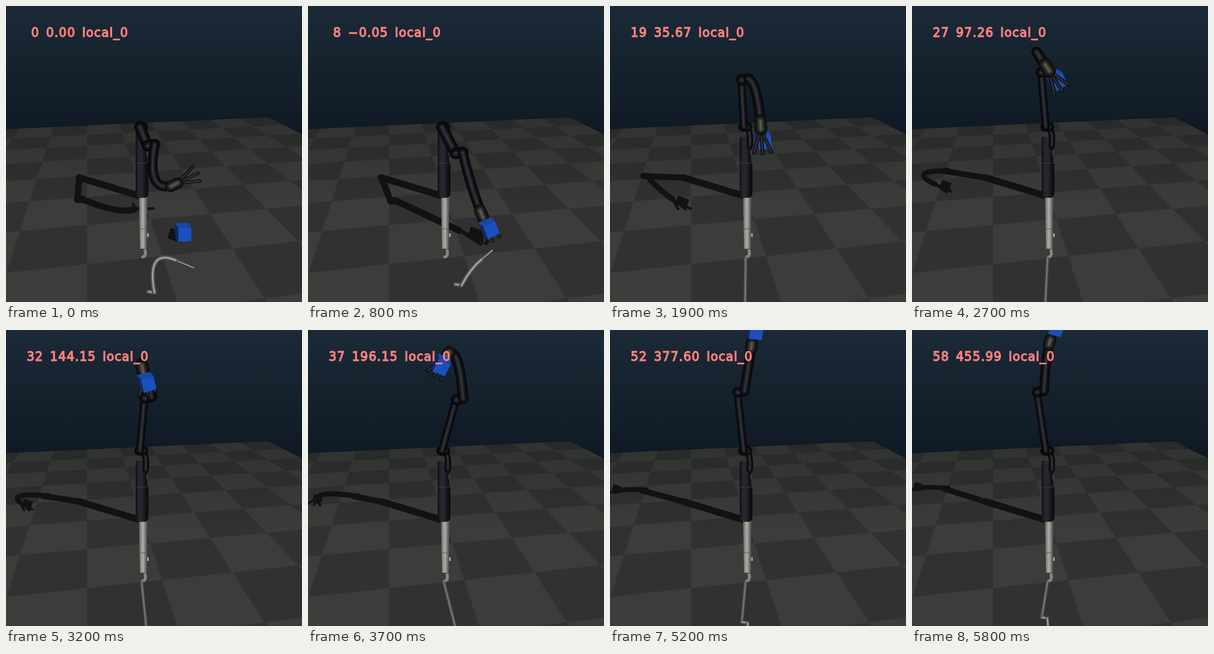
An HTML page with a canvas that plays this animation: 500 px wide and 500 px high, repeating every 5.9 s.

```html
<!DOCTYPE html>
<html lang="en">
<head>
<meta charset="utf-8">
<title>Robot arm lifting a cube</title>
<style>
html, body { margin: 0; width: 100%; height: 100%; overflow: hidden; background: #0d1620; }
canvas { display: block; }
#label {
  position: absolute; left: 35px; top: 33px; white-space: pre;
  font: 20.5px/24px "DejaVu Sans", sans-serif;
  letter-spacing: 1px; word-spacing: 3.7px;
  color: #ff8080; -webkit-text-stroke: 1.3px #ff8080;
}
</style>
</head>
<body>
<canvas id="stage" width="500" height="500"></canvas>
<div id="label"></div>
<script>
const ctx = document.getElementById('stage').getContext('2d');
const label = document.getElementById('label');

// Camera: focal length in pixels, height above the floor, pitch 20deg, yaw 10deg.
const FOCAL = 603.55, HEIGHT = 3.03, RAD = Math.PI / 180;
const S = Math.sin(20 * RAD), C = Math.cos(20 * RAD);
const YS = Math.sin(10 * RAD), YC = Math.cos(10 * RAD);

// Space is [right, forward, up]; screen points carry their pixel scale.
function project([r, d, z]) {
  const h = z - HEIGHT, k = C * d - S * h;
  return [250 + FOCAL * r / k, 250 - FOCAL * (C * h + S * d) / k, FOCAL / k];
}
function lift(x, y, d) {
  const q = (y - 250) / FOCAL;
  const h = -(q * C + S) * d / (C - q * S);
  return [(x - 250) / FOCAL * (C * d - S * h), d, h + HEIGHT];
}
const shadow = ([r, d, z]) => [r - .98 * z, d + .65 * z, 0];
const mirror = ([r, d, z]) => [r, d, -z];
const same = p => p;
const add = (p, v, k = 1) => p.map((c, n) => c + v[n] * k);
const mix = (p, q, t) => p.map((c, n) => c + (q[n] - c) * t);
const dot = (p, q) => p.reduce((sum, c, n) => sum + c * q[n], 0);
const unit = v => v.map(c => c / Math.hypot(...v));

// Key poses on screen; distances follow from the arm's geometry.
const poses = [
  { step: 0,  score: 0,      elbow: [239, 236], wrist: [236, 325], hand: [290, 299] },
  { step: 8,  score: -.05,   elbow: [249, 249], wrist: [276, 310], hand: [296, 358] },
  { step: 19, score: 35.67,  elbow: [222, 125], wrist: [250, 132], hand: [255, 208] },
  { step: 27, score: 97.26,  elbow: [218, 112], wrist: [190, 45],  hand: [232, 110] },
  { step: 37, score: 196.15, elbow: [250, 118], wrist: [254, 14],  hand: [232, 48] },
  { step: 46, score: 301.15, elbow: [221, 106], wrist: [245, 50],  hand: [243, 30] },
  { step: 58, score: 455.99, elbow: [211, 105], wrist: [226, 40],  hand: [234, 16] }
];
const GRASP = 8, REACH = 1;
const base = lift(230, 322, 6), shoulder = lift(226, 204, 6);
const cubeRest = [302, 387];

// Monotone cubic through one value per pose.
function at(step, pick) {
  const last = poses.length - 1;
  const secant = n => (pick(poses[n + 1]) - pick(poses[n])) / (poses[n + 1].step - poses[n].step);
  const slope = n => {
    const a = secant(Math.max(n - 1, 0)), b = secant(Math.min(n, last - 1));
    return a * b > 0 ? 2 * a * b / (a + b) : 0;
  };
  let i = 0;
  while (i < last - 1 && step >= poses[i + 1].step) i++;
  const h = poses[i + 1].step - poses[i].step, t = (step - poses[i].step) / h;
  const e = t * t * (3 - 2 * t);
  return pick(poses[i]) * (1 - e) + pick(poses[i + 1]) * e
    + h * t * (1 - t) * ((1 - t) * slope(i) - t * slope(i + 1));
}
const place = (step, joint) => [0, 1].map(n => at(step, p => p[joint][n]));

// Nearest point on the view ray that lies one upper arm from the shoulder.
function reachFrom(x, y) {
  const eye = [0, 0, HEIGHT];
  const ray = add(lift(x, y, 1), eye, -1), goal = add(shoulder, eye, -1);
  const a = dot(ray, ray), b = dot(ray, goal);
  const root = Math.sqrt(Math.max(0, b * b - a * (dot(goal, goal) - REACH * REACH)));
  return lift(x, y, (b - root) / a);
}

function polygon(points, fill) {
  ctx.beginPath();
  points.forEach(([x, y]) => ctx.lineTo(x, y));
  ctx.closePath();
  ctx.fillStyle = fill;
  ctx.fill();
}

// Layers of [colour, share of width] that brighten towards the middle.
function shade(hue, saturation, dark, light, share = 1) {
  return Array.from({ length: 8 }, (_, i) => {
    const l = dark + (light - dark) * (i / 7) ** 2;
    return [`hsl(${hue} ${saturation}% ${l}%)`, share * (1 - i / 8)];
  });
}
const METAL = shade(240, 9, 4, 22);
const HAND = shade(60, 4, 6, 34);
const FINGER = shade(0, 0, 6, 24);
const SHADE = [['#121311', .75]];
const GLOSS = shade(60, 2, 26, 70, .6);
const DIM = shade(60, 2, 28, 50, .6);

// Two points give a line, three a curve bent by the middle one.
function tube(points, width, layers, move = same, cap = 'round') {
  const p = points.map(q => project(move(q)));
  const scale = p.reduce((sum, q) => sum + q[2], 0) / p.length;
  const [bend, end] = [p[1], p[p.length - 1]];
  ctx.beginPath();
  ctx.moveTo(p[0][0], p[0][1]);
  ctx.quadraticCurveTo(bend[0], bend[1], end[0], end[1]);
  ctx.lineCap = cap;
  for (const [colour, share] of layers) {
    ctx.strokeStyle = colour;
    ctx.lineWidth = width * share * scale;
    ctx.stroke();
  }
}

function across(x0, x1, ...colours) {
  const g = ctx.createLinearGradient(x0, 0, x1, 0);
  colours.forEach((c, i) => g.addColorStop(i / (colours.length - 1), c));
  return g;
}

function backdrop() {
  const sky = ctx.createLinearGradient(0, 0, 0, 205);
  sky.addColorStop(0, '#1b2a37');
  sky.addColorStop(1, '#0f1a25');
  ctx.fillStyle = sky;
  ctx.fillRect(0, 0, 500, 500);

  const spot = (i, j) => {
    const u = 1.028 * i - .19, v = 11.166 - 1.01 * j;
    return project([u * YC - v * YS, u * YS + v * YC, 0]);
  };
  const floor = [spot(-6, 0), spot(6, 0), spot(6, 9), spot(-6, 9)];
  polygon(floor, '#313131');
  for (let j = 0; j < 9; j++)
    for (let i = -6; i < 6; i++)
      if ((i + j) % 2 === 0)
        polygon([spot(i, j), spot(i + 1, j), spot(i + 1, j + 1), spot(i, j + 1)], '#3b3d3a');
  const haze = ctx.createLinearGradient(0, 190, 0, 340);
  haze.addColorStop(0, 'rgba(10,14,16,.22)');
  haze.addColorStop(1, 'rgba(10,14,16,0)');
  polygon(floor, haze);
}

function column(top) {
  ctx.fillStyle = across(219, 241, '#101014', '#26262e', '#26262e', '#131318', '#09090c');
  ctx.beginPath();
  ctx.roundRect(219, top, 19.5, 268 - top, 3);
  ctx.roundRect(219, 264, 21.5, 60, [2, 2, 7, 7]);
  ctx.fill();
  ctx.fillStyle = '#3a3a42';
  ctx.fillRect(220, 265, 19, 1);
  ctx.fillRect(237, 244, 3, 8);
}

function columnMirror() {
  polygon([[224.5, 323], [239, 323], [237.5, 410], [226.5, 410]],
    across(224, 239, '#4c4c4a', '#8c8c89', '#acaca9', '#777775', '#444442'));
  ctx.fillStyle = '#5b5b58';
  ctx.fillRect(225, 376, 13, 1);
  ctx.fillStyle = '#b0b0ac';
  ctx.fillRect(238.5, 384, 2.5, 6);
  ctx.strokeStyle = '#858581';
  ctx.lineWidth = 5;
  ctx.lineCap = 'round';
  ctx.beginPath();
  ctx.moveTo(235, 413);
  ctx.quadraticCurveTo(237, 423, 231, 424);
  ctx.stroke();
}

// Three fingers fan out around the direction of the hand.
function fingers(hand, [r, d, z]) {
  return [-.4, 0, .4].map(a => {
    const dir = [r * Math.cos(a) - z * Math.sin(a), d, r * Math.sin(a) + z * Math.cos(a)];
    return [add(hand, dir, .04), add(hand, dir, .35)];
  });
}

function drawCube([x, y], turn) {
  ctx.save();
  ctx.translate(x, y);
  ctx.rotate(turn);
  polygon([[-11, -12], [-17, -20], [7, -21], [11, -12]], '#1a46a4');
  polygon([[-11, -12], [-17, -20], [-16, 5], [-11, 12]], '#0e2860');
  polygon([[-11, -12], [11, -12], [11, 10], [-11, 12]], '#1b4fbd');
  ctx.restore();
}

function draw(step) {
  const [ex, ey] = place(step, 'elbow');
  const elbow = reachFrom(ex, ey);
  const joint = lift(ex + 12, ey - 2, elbow[1]);
  const away = step - GRASP;
  const hand = lift(...place(step, 'hand'), 4.6 + (away < 0 ? -.056 : .02) * away);
  const wrist = lift(...place(step, 'wrist'), (elbow[1] + hand[1]) / 2);
  const aim = unit(add(hand, wrist, -1));
  const claws = fingers(hand, aim);
  const forearm = [joint, wrist, hand];
  const raised = elbow[2] > shoulder[2] + .2;

  const held = Math.min(1, Math.max(0, (step - 5) / (GRASP - 5)));
  const grip = project(add(hand, aim, .2));
  const cube = mix(cubeRest, [grip[0] + 5, grip[1] - 1], held);
  const turn = -.5 * held * Math.sin(2 * Math.atan2(aim[2], aim[0]) + Math.PI);
  const cubeHidden = raised && hand[2] < 2.6;

  backdrop();

  const centre = lift(cube[0] - 2, cube[1] - 4, held < 1 ? 4.62 : hand[1]);
  const block = [-.12, .12].map(z => [centre[0], centre[1], Math.max(0, centre[2] + z)]);
  tube(block, .22, SHADE, shadow, 'butt');
  tube([base, shoulder], .18, SHADE, shadow);
  tube([shoulder, elbow], .17, SHADE, shadow);
  tube([elbow, joint], .17, SHADE, shadow);
  tube(forearm, .15, SHADE, shadow);
  claws.forEach(c => tube(c, .06, SHADE, shadow));

  columnMirror();
  if (raised) tube([shoulder, elbow], .11, DIM, mirror, 'butt');
  tube([elbow, joint], .13, GLOSS, mirror);
  tube(forearm, .13, GLOSS, mirror);
  tube(claws[1], .06, GLOSS, mirror);

  column(raised ? 221 : 206);
  if (raised) tube([lift(236, 236, 6), lift(239, 206, 6), shoulder], .11, METAL);
  tube([lift(225, 204, 6), lift(232, 204, 6)], .17, METAL);
  tube([shoulder, elbow], raised ? .13 : .18, METAL);
  tube([elbow, joint], .17, METAL);

  if (cubeHidden) drawCube(cube, turn);
  tube(forearm, .15, METAL);
  claws.forEach(c => tube(c, .05, FINGER));
  tube([add(hand, aim, -.12), hand], .18, HAND);
  if (!cubeHidden) drawCube(cube, turn);

  const score = at(step, p => p.score).toFixed(2).replace('-', '\u2212');
  label.textContent = `${String(step).padStart(2)} ${score} local_0`;
}

function tick() {
  draw(Math.floor(performance.now() % 5900 / 100));
  requestAnimationFrame(tick);
}
tick();
</script>
</body>
</html>
```
